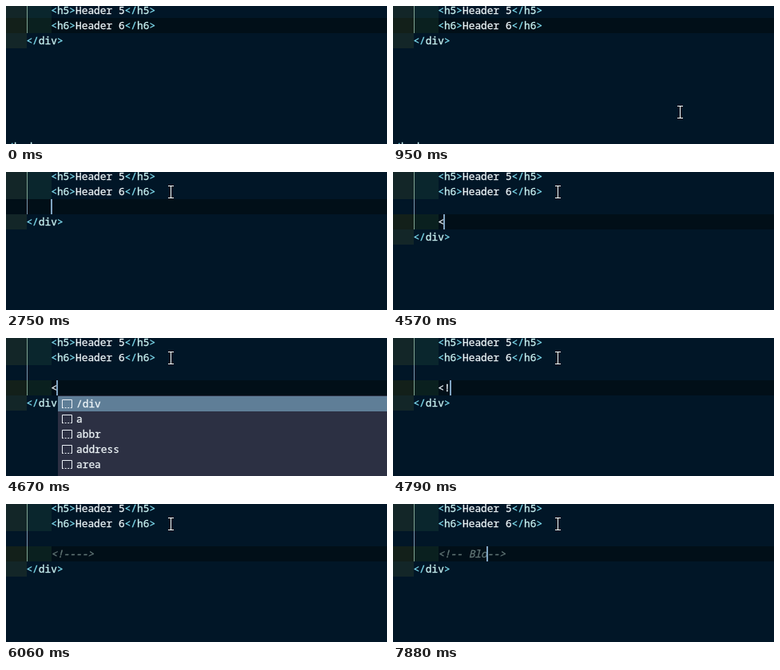
An HTML page that plays this animation: 477x173 px, repeating every 8 s.

```html
<!DOCTYPE html>
<html lang="en">
<head>
<meta charset="utf-8">
<title>Code editor</title>
<style>
  html, body { margin: 0; width: 100%; height: 100%; overflow: hidden; background: #011627; }
  svg { display: block; width: 477px; height: 173px; }
  text { font: 12.83px "Noto Sans Mono", monospace; white-space: pre; }
  text, tspan { fill: currentColor; stroke: currentColor; stroke-width: .3px; }
  text { color: #eef5f8; }
  .mark { color: #7fdcee; }
  .name { color: #cbf2f2; }
  .note { color: #637777; font-style: italic; }
  .docs { font: 13.5px "Open Sans", sans-serif; stroke: none; }
</style>
</head>
<body>
<svg id="stage" viewBox="0 0 477 173"></svg>
<script>
const LOOP = 8000, CHAR = 7.7, LINE = 19, LEFT = 56.2, TOP = -4;
const stage = document.getElementById('stage');

// [start, typed text, caret column, caret row, caret visible]
const EDITS = [
  [0, '', 17, 1, 0], [1730, '', 17, 1, 1], [2240, '', 17, 1, 0],
  [2750, '', 0, 2, 1],
  [3200, '', 0, 3, 1], [3660, '', 0, 3, 0], [4170, '', 0, 3, 1],
  [4570, '<', 1, 3, 1], [4740, '<!', 2, 3, 1], [5280, '<!-', 3, 3, 1],
  [5580, '<!---->', 4, 3, 1], [6060, '<!---->', 4, 3, 0], [6590, '<!---->', 4, 3, 1],
  [6940, '<!-- -->', 5, 3, 1], [7340, '<!-- B-->', 6, 3, 1],
  [7670, '<!-- Bl-->', 7, 3, 1], [7880, '<!-- Blo-->', 8, 3, 1]
];
const INDENT_DELAY = 2880;
const PATH = [[407, 160], [371, 140], [295, 86], [211, 27]];

const rowY = row => TOP + row * LINE;
const rect = (x, y, w, h, fill) =>
  `<rect x="${x}" y="${y}" width="${w}" height="${h}" fill="${fill}"/>`;
const text = (x, y, body, cls = '') => `<text x="${x}" y="${y}" class="${cls}">${body}</text>`;
const esc = s => s.replace(/</g, '&lt;').replace(/>/g, '&gt;');
const span = (cls, s) => `<tspan class="${cls}">${esc(s)}</tspan>`;
const open = tag => span('mark', '<') + span('name', tag) + span('mark', '>');
const close = tag => span('mark', '</') + span('name', tag) + span('mark', '>');
const codeLine = (row, col, body, cls) =>
  text(LEFT + col * CHAR, rowY(row) + 14, body, cls);

function indent(row, depth) {
  const outer = rect(0, rowY(row), 26, LINE, 'rgba(255,255,64,.07)');
  if (depth < 2) return outer;
  return outer + rect(26, rowY(row), 31, LINE, 'rgba(127,255,127,.07)') +
    rect(26, rowY(row), 1, LINE, '#7fa392');
}

function icon(x, y) {
  return `<path d="M${x + .5} ${y + 10}V${y + .5}H${x + 12.5}V${y + 10}" fill="none" stroke="#e8eef4"/>` +
    `<path d="M${x} ${y + 10.5}h13" stroke="#e8eef4" stroke-dasharray="2 1.6"/>`;
}

function popup(x, items, height) {
  const rows = items.map((item, i) => {
    const y = 73 + i * LINE;
    return (i ? '' : rect(x, y, 477 - x, LINE, '#5f7e97')) +
      icon(x + 5, y + 4) + text(x + 23, y + 14, item);
  });
  return rect(x, 72, 477 - x, height, '#2c3043') + rows.join('');
}

function suggestions(t) {
  if (t >= 4640 && t < 4740) return popup(65, ['/div', 'a', 'abbr', 'address', 'area'], 101);
  if (t < 5350 || t >= 5580) return '';
  const docs = t >= 5430;
  return popup(80, ['#region', '#endregion'], docs ? 81 : 40) +
    (docs ? text(86, 133, 'Folding Region Start', 'docs') : '');
}

function pointerAt(t) {
  if (t >= 1410) {
    const k = Math.min(1, (t - 1410) / 100);
    return [211 - 4 * k, 27 - 2 * k];
  }
  const u = (t - 620) / 790;
  const s = u * u * (3 - 2 * u) * (PATH.length - 1);
  const i = Math.min(PATH.length - 2, Math.floor(s));
  return PATH[i].map((v, axis) => v + (PATH[i + 1][axis] - v) * (s - i));
}

function pointer(t) {
  if (t < 620) return '';
  const [x, y] = pointerAt(t).map(Math.round);
  const beam = 'M-4 -7.5H3M-.5 -7V7M-4 7.5H3';
  return `<g transform="translate(${x} ${y})" fill="none">` +
    `<path d="${beam}" stroke="#000" stroke-opacity=".45" stroke-width="2"/>` +
    `<path d="${beam}" stroke="#fff"/></g>`;
}

function draw(t) {
  const [, typed, col, row, caret] = EDITS.filter(e => e[0] <= t).pop();
  const last = row + 1;
  let out = rect(0, 0, 477, 173, '#011627');
  out += rect(0, rowY(row), 477, LINE, '#010f18');
  out += rect(26, 0, 1, rowY(last), '#7e97ac');
  out += indent(0, 2) + indent(1, 2) + indent(last, 1);
  if (row > 1 && t >= INDENT_DELAY) out += indent(row, 2);
  out += codeLine(0, 0, open('h5') + 'Header 5' + close('h5'));
  out += codeLine(1, 0, open('h6') + 'Header 6' + close('h6'));
  out += codeLine(last, -4, close('div'));
  out += codeLine(last + 7, -8, close('body'));
  out += codeLine(row, 0, esc(typed), typed.startsWith('<!--') ? 'note' : '');
  if (caret) out += rect(Math.floor(LEFT + col * CHAR), rowY(row), 2, LINE, '#80a4c2');
  stage.innerHTML = out + suggestions(t) + pointer(t);
}

const start = performance.now();
function tick() {
  draw((performance.now() - start) % LOOP);
  requestAnimationFrame(tick);
}
tick();
</script>
</body>
</html>
```
